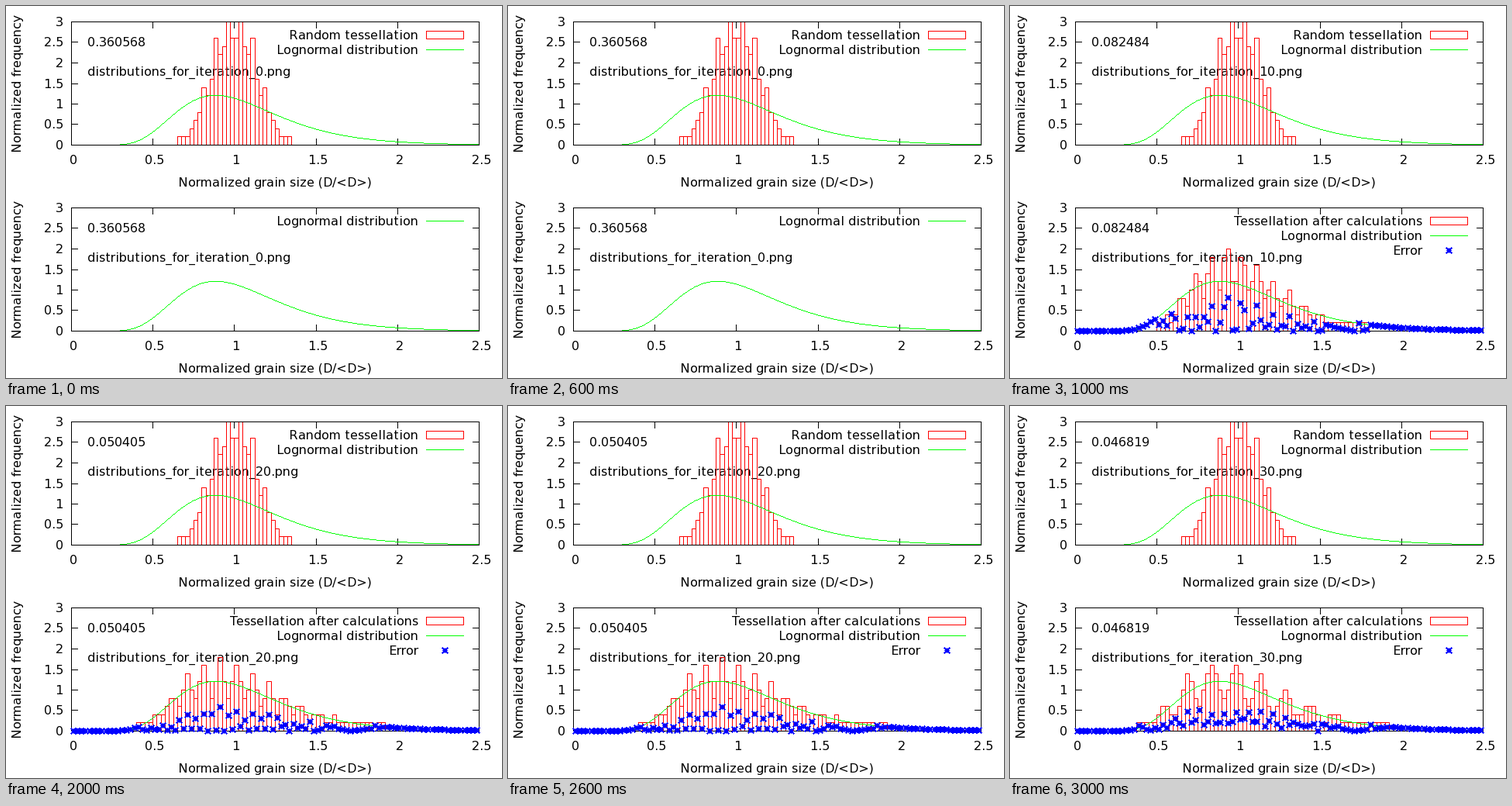
Animation of 640x480 px, one loop 4 s. Source, as a matplotlib script:

```python
import numpy as np
import matplotlib.pyplot as plt
from matplotlib.animation import FuncAnimation
from matplotlib.collections import LineCollection

DPI = 100
PX = 72 / DPI
FONT = 16 * PX
LEFT, RIGHT, HEIGHT = 84, 610, 159
X_UNIT, Y_UNIT = (RIGHT - LEFT) / 2.5, HEIGHT / 3
BIN = 0.025
GRAIN_HEIGHT = 0.2
CENTERS = (np.arange(100) + 0.5) * BIN
RED, GREEN, BLUE = "#ff0000", "#00ff00", "#0000ff"

plt.rcParams.update({"font.family": "DejaVu Sans", "text.hinting_factor": 1})
fig = plt.figure(figsize=(640 / DPI, 480 / DPI), dpi=DPI, facecolor="white")
ax = fig.add_axes([0, 0, 1, 1])


def normal(x, sigma):
    return np.exp(-((x - 1) / sigma) ** 2 / 2) / (sigma * np.sqrt(2 * np.pi))


def lognormal(x, sigma=0.35):
    return np.exp(-np.log(x) ** 2 / (2 * sigma**2)) / (x * sigma * np.sqrt(2 * np.pi))


def histogram(density, period, peak, depth):
    """Whole grains per bin: a density with a ripple of the given period in bins."""
    ripple = 1 + depth * np.cos(2 * np.pi * (np.arange(100) - peak) / period)
    return np.round(density * ripple / GRAIN_HEIGHT) * GRAIN_HEIGHT


INITIAL = histogram(normal(CENTERS, 0.13), 3, 38, 0.25)
STEPS = [
    ("0.360568", None),
    ("0.082484", histogram(lognormal(CENTERS, 0.27), 3.8, 32.8, 0.35)),
    ("0.050405", histogram(lognormal(CENTERS, 0.33), 4, 36, 0.35)),
    ("0.046819", histogram(lognormal(CENTERS, 0.35), 6, 39, 0.4)),
]


def x_pixel(x):
    return np.round(LEFT + x * X_UNIT)


def y_pixel(y, bottom):
    return np.round(bottom - y * Y_UNIT)


def line(xs, ys, color, zorder):
    """One pixel wide line through pixel centres, both ends included."""
    ax.plot(np.asarray(xs) + 0.5, np.asarray(ys) + 0.5, color=color, lw=PX,
            zorder=zorder, snap=False, solid_capstyle="projecting",
            solid_joinstyle="miter")


def box(x0, y0, x1, y1, color, zorder):
    line([x0, x1, x1, x0, x0], [y0, y0, y1, y1, y0], color, zorder)


def segments(parts, color, zorder):
    ax.add_collection(LineCollection(parts, colors=color, linewidths=PX, zorder=zorder,
                                     antialiaseds=False, snap=False))


def stars(xs, ys, r=3.5):
    arms = [(r, 0), (0, r), (r, r), (r, -r)]
    segments([[(x + 0.5 - dx, y + 0.5 - dy), (x + 0.5 + dx, y + 0.5 + dy)]
              for x, y in zip(xs, ys) for dx, dy in arms], BLUE, 7)


def text(x, baseline, s, ha="left", **kw):
    ax.text(x, baseline, s, ha=ha, va="baseline", fontsize=FONT,
            color="black", zorder=2, **kw)


def frame_and_ticks(top):
    bottom = top + HEIGHT
    box(LEFT, top, RIGHT, bottom, "black", 5)
    for value in np.arange(0, 2.6, 0.5):
        x = x_pixel(value)
        line([x, x], [top, top + 8], "black", 1)
        line([x, x], [bottom - 8, bottom], "black", 1)
        text(x + 3, bottom + 25, f"{value:g}", "center")
    for value in np.arange(0, 3.1, 0.5):
        y = y_pixel(value, bottom)
        line([LEFT, LEFT + 8], [y, y], "black", 1)
        line([RIGHT - 8, RIGHT], [y, y], "black", 1)
        text(74, y + 6, f"{value:g}", "right")
    text(347, bottom + 54, "Normalized grain size (D/<D>)", "center")
    text(20, top + 80, "Normalized frequency", "center",
         rotation=90, rotation_mode="anchor")


def bars(heights, bottom):
    for k in np.flatnonzero(heights):
        box(x_pixel(k * BIN), y_pixel(min(heights[k], 3), bottom),
            x_pixel((k + 1) * BIN), bottom, RED, 3)


def curve(bottom):
    columns = np.arange(LEFT + 1, RIGHT)
    rows = y_pixel(lognormal((columns - LEFT) / X_UNIT), bottom) + 0.5
    segments([[(x, y), (x + 1, y)] for x, y in zip(columns, rows)], GREEN, 4)


def errors(heights, bottom):
    error = np.abs(heights - lognormal(CENTERS))
    stars(x_pixel(CENTERS), y_pixel(error, bottom))


def legend(top, bar_label, with_error):
    y = top + 17
    if bar_label:
        text(532, y + 6, bar_label, "right")
        box(542, y - 5, 590, y + 5, RED, 3)
        y += 19
    text(532, y + 6, "Lognormal distribution", "right")
    line([542, 590], [y, y], GREEN, 4)
    if with_error:
        y += 19
        text(532, y + 6, "Error", "right")
        stars([566], [y])


def panel(top, step, heights, bar_label, with_error):
    bottom = top + HEIGHT
    frame_and_ticks(top)
    text(105, top + 32, STEPS[step][0])
    text(105, top + 70, f"distributions_for_iteration_{10 * step}.png")
    curve(bottom)
    if heights is not None:
        bars(heights, bottom)
    if with_error:
        errors(heights, bottom)
    legend(top, bar_label, with_error)


def update(step):
    ax.clear()
    ax.set(xlim=(0, 640), ylim=(480, 0))
    ax.axis("off")
    heights = STEPS[step][1]
    done = heights is not None
    panel(20, step, INITIAL, "Random tessellation", False)
    panel(260, step, heights, "Tessellation after calculations" if done else None, done)
    return []


anim = FuncAnimation(fig, update, frames=len(STEPS), init_func=lambda: update(0),
                     interval=1000, repeat=True, repeat_delay=0, blit=False)
plt.show()
```
